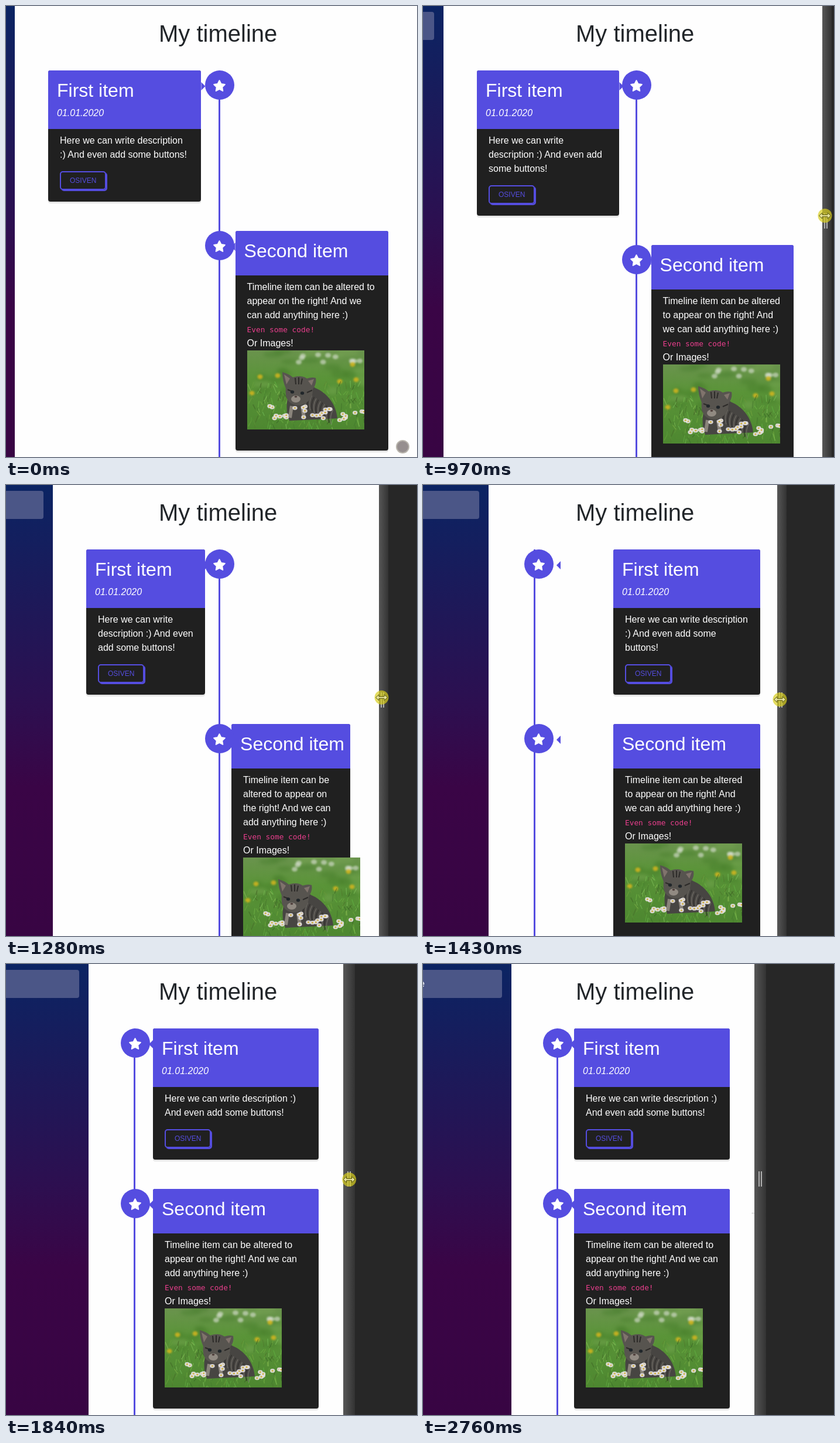
An HTML page for the animation above (3.47 s loop, 702x770 px).

```html
<!DOCTYPE html>
<html lang="en">
<head>
<meta charset="utf-8">
<title>My timeline</title>
<style>
:root { --accent: #554de0; }
* { box-sizing: border-box; }
html, body { margin: 0; width: 100%; height: 100%; overflow: hidden; }
body { font: 16px/24px "Liberation Sans", Arial, sans-serif; color: #fff; }
#stage { position: relative; width: 702px; height: 770px; overflow: hidden; background: #fefefe; }
#stage > * { position: absolute; }
#side { left: 0; top: 0; height: 770px; overflow: hidden;
  background: linear-gradient(#0b2463, #2d0f50 49%, #3a0546 67%, #380543); }
#field { position: absolute; left: -60px; right: 16px; top: 10px; height: 48px;
  border-radius: 4px; background: #4b5687; }
#field span { position: absolute; right: 132px; top: 12px; }
h1 { left: 261px; top: 23px; margin: 0; font-size: 40px; line-height: 48px; font-weight: 400;
  color: #212529; white-space: nowrap; }
#list { top: 110px; }
#line { position: absolute; top: 0; width: 3px; height: 700px; background: var(--accent); }
.row { position: relative; margin-bottom: 50px; }
.card { border-radius: 4px; background: #202020; box-shadow: 0 3px 0 #e5e5e5; }
.head { padding: 15px; background: var(--accent); border-radius: 3px 3px 0 0; white-space: nowrap; }
h2 { margin: 0 0 8px; font-size: 32px; line-height: 38px; font-weight: 400; }
.text { padding: 8px 19px 20px 20px; }
.text svg { display: block; margin-bottom: 16px; }
.button { display: block; width: max-content; height: 32px; margin-top: 16px; padding: 0 15px;
  border: 2px solid var(--accent); border-radius: 5px; box-shadow: 2px 2px 0 var(--accent);
  color: var(--accent); font-size: 12px; line-height: 28px; }
code { display: block; height: 24px; font: 12.8px/25px "DejaVu Sans Mono", monospace;
  color: #e83e8c; white-space: nowrap; }
.arrow { position: absolute; top: 20px; width: 7px; height: 14px; background: var(--accent); }
.arrow.left { clip-path: polygon(100% 0, 0 50%, 100% 100%); }
.arrow.right { clip-path: polygon(0 0, 100% 50%, 0 100%); }
.dot { position: absolute; top: 0; width: 50px; height: 50px; border-radius: 50%; background: var(--accent); }
.dot svg { display: block; }
#panel { top: 0; width: 702px; height: 770px; background: #272727; }
#bar { height: 770px; background: linear-gradient(90deg, #575757, #3c3c3c 75%, #333); }
#grip { position: absolute; top: 354px; width: 6px; height: 26px;
  border: solid #b0b0b0; border-width: 0 2px; }
#pointer { left: 0; top: 0; overflow: visible; }
.speck { background: #d5d5d5; }
</style>
</head>
<body>
<div id="stage">
  <h1>My timeline</h1>
  <div id="list">
    <div id="line"></div>
    <div class="row">
      <div class="card">
        <div class="head"><h2>First item</h2><i>01.01.2020</i></div>
        <div class="text">Here we can write description :) And even add some buttons!
          <span class="button">OSIVEN</span></div>
      </div>
      <div class="arrow"></div><div class="dot"></div>
    </div>
    <div class="row">
      <div class="card">
        <div class="head"><h2>Second item</h2></div>
        <div class="text">Timeline item can be altered to appear on the right! And we can add anything here :)
          <code>Even some code!</code>Or Images!
          <svg id="photo" width="200" height="135"></svg></div>
      </div>
      <div class="arrow"></div><div class="dot"></div>
    </div>
  </div>
  <div id="side"><div id="field"><span>e</span></div></div>
  <div id="panel"><div id="bar"></div><div id="grip"></div></div>
  <div class="speck" id="edgeSpeck" style="left:701px;top:352px;width:1px;height:8px"></div>
  <div class="speck" id="leftSpeck" style="left:561px;top:423px;width:5px;height:5px;clip-path:polygon(0 50%,40% 20%,40% 40%,100% 40%,100% 60%,40% 60%,40% 80%)"></div>
  <svg id="pointer" width="1" height="1">
    <circle id="halo" stroke-width="2"/>
    <path id="resize" d="M-10 0L-4.5-5V-1.6H4.5V-5L10 0L4.5 5V1.6H-4.5V5Z" fill="#e6e29a" stroke="#55540c"/>
  </svg>
</div>
<script>
const LOOP = 3470;
const $ = id => document.getElementById(id);
const all = sel => [...document.querySelectorAll(sel)];
const mix = (a, b, p) => a + (b - a) * p;
const clamp = x => Math.min(1, Math.max(0, x));
const px = (el, styles) => { for (const k in styles) el.style[k] = styles[k] + 'px'; };

// [time, left edge of the page]
const drag = [
  [0, 15], [770, 16], [820, 19], [870, 23], [920, 29], [960, 35], [1010, 42], [1060, 49],
  [1110, 56], [1150, 63], [1200, 70], [1250, 75],
  [1280, 80], [1330, 90], [1380, 101], [1430, 112], [1480, 122], [1520, 129], [1570, 134],
  [1610, 137], [1660, 138], [1740, 139],
  [1810, 141], [1850, 143], [1890, 146], [1930, 148], [1980, 150], [2020, 151]
];
const leave = [2450, 2490, 2540, 2580, 2630, 2670, 2720, 2760];

const star = Array.from({ length: 10 }, (_, i) => {
  const r = i % 2 ? 4.9 : 9.8, a = i * Math.PI / 5;
  return (24.5 + r * Math.sin(a)).toFixed(2) + ',' + (27 - r * Math.cos(a)).toFixed(2);
}).join(' ');
for (const dot of all('.dot')) dot.innerHTML =
  `<svg width="50" height="50"><polygon points="${star}" fill="#fff" stroke="#fff" stroke-width="2" stroke-linejoin="round"/></svg>`;

function paintPhoto() {
  let seed = 11;
  const rnd = (a, b) => (seed = seed * 16807 % 2147483647, a + (b - a) * seed / 2147483647);
  const many = (n, f) => Array.from({ length: n }, (_, i) => f(i)).join('');
  const blob = (x, y, rx, ry, c, o = 1) =>
    `<ellipse cx="${x}" cy="${y}" rx="${rx}" ry="${ry}" fill="${c}" opacity="${o}"/>`;
  const grass = many(260, () => {
    const x = rnd(0, 200), y = rnd(60, 140);
    return `<path d="M${x} ${y}l${rnd(-6, 6)} ${-rnd(5, 13)}" stroke="hsl(${rnd(88, 105)} 45% ${rnd(24, 58)}%)" stroke-width="1.3" opacity=".6"/>`;
  });
  const haze = many(24, () =>
    blob(rnd(0, 200), rnd(0, 70), rnd(8, 18), rnd(4, 9), rnd(0, 1) < .5 ? '#7aa955' : '#437a29', .4));
  const far = many(11, () => blob(rnd(85, 200), rnd(0, 22), 5, 4, '#d3dccb', .65));
  const gold = [[22, 45], [52, 43], [158, 53], [186, 50], [180, 24], [8, 73]]
    .map(([x, y]) => blob(x, y, 4.5, 4, '#d3b51f', .85)).join('');
  const daisies = many(30, i => {
    const x = i < 8 ? rnd(34, 70) : rnd(70, 199), y = rnd(94, 119);
    return blob(x, y, 4.2, 3.4, '#e6e1e0', .9) + blob(x, y, 1.5, 1.3, '#cfae35');
  });
  const fur = many(14, i => {
    const x = 100 + i * 3.6, y = 70 + i * 2.4;
    return `<path d="M${x} ${y}q-7 12 -3 25" stroke="${i % 2 ? '#757069' : '#2c2a28'}" stroke-width="1.6" fill="none" opacity=".7"/>`;
  });
  $('photo').innerHTML = `<defs><linearGradient id="meadow" x2="0" y2="1">
      <stop stop-color="#6a934d"/><stop offset=".35" stop-color="#5a9438"/><stop offset="1" stop-color="#4d8730"/>
    </linearGradient></defs>
    <rect width="200" height="135" fill="url(#meadow)"/>
    <g style="filter:blur(3px)">${haze}</g>
    <g style="filter:blur(1.5px)">${far}${gold}</g>${grass}
    <g style="filter:blur(.6px)">
      <path d="M72 72C78 58 104 54 116 64C136 72 152 92 154 116L72 120C66 104 66 88 72 72Z" fill="#474542"/>${fur}
      <path d="M60 37Q71 40 78 46Q92 41 102 48Q110 45 117 47Q119 57 112 66Q113 82 100 90Q86 98 73 89Q64 82 66 65Q60 52 60 37Z" fill="#57544f"/>
      <path d="M63 41L73 48L67 58ZM114 49L104 52L110 60Z" fill="#80736c"/>
      <path d="M82 47l1 11M88 46v12M94 48l-2 10M69 67l8 3M111 68l-9 4" stroke="#2d2b29" stroke-width="2"/>
      ${blob(77, 71, 3.2, 2.7, '#20262a')}${blob(94, 73, 3.2, 2.7, '#20262a')}
      ${blob(83, 83, 8, 6, '#918a82')}${blob(83, 79, 2.3, 1.6, '#493936')}
      <path d="M76 95l-3 20M94 95l3 20" stroke="#8a847b" stroke-width="6"/>
    </g>
    <g style="filter:blur(.5px)">${daisies}</g>`;
}

function layout(t, left) {
  const right = 717 - left, x = left + 57, c = 611 - 2 * left;
  const narrow = t >= 1330, u = clamp((t - 1300) / 280), p = u * u * (3 - 2 * u);
  const cards = all('.card'), arrows = all('.arrow'), dots = all('.dot');
  const midDot = c / 2 - 22.5;

  px($('list'), { left: x, width: c });
  px($('line'), { left: narrow ? 20 : c / 2 + .5 });
  cards.forEach((card, i) => {
    let w = .45 * c, at = i ? c - w : 0, tip = i ? at - 7 : w;
    let dot = midDot;
    if (narrow) {
      const home = .143 * c + 5.8;
      at = Math.round(mix(.6 * c, home, p));
      w = mix(.484 * c, .821 * c + 12.4, p);
      tip = Math.round(home + 9 * (1 - p)) - 7;
      dot = Math.round(mix(Math.round(.02 * c - 9), midDot, (1 - u) ** 5.7));
    }
    px(card, { marginLeft: at, width: w });
    px(arrows[i], { left: tip });
    arrows[i].className = 'arrow ' + (narrow || i ? 'left' : 'right');
    px(dots[i], { left: dot });
  });

  const extra = left < 120 ? 0 : 4;
  px($('side'), { width: left });
  px($('panel'), { left: right });
  px($('bar'), { width: 16 + extra });
  px($('grip'), { left: 3 + extra });
  return { x: right + 4.5 + extra * 1.4, y: Math.min(368, 356 + (left - 15) * .105) };
}

function showPointer(t, grab) {
  const held = t >= 770 && t < 2450;
  let at = null;
  if (t < 40) at = { x: 677.5, y: 752.5 };
  else if (held) at = grab;
  else if (t >= 2450 && t < 2760) {
    const u = leave.filter(s => s <= t).length / 7;
    at = { x: 576 - 48 * u ** 1.3, y: 370 + 372 * u ** 1.9 };
  }
  $('pointer').style.display = at ? 'block' : 'none';
  if (at) $('pointer').style.transform = `translate(${at.x}px, ${at.y}px)`;
  $('halo').setAttribute('fill', held ? 'rgba(215,205,30,.7)' : 'rgba(110,100,100,.72)');
  $('halo').setAttribute('stroke', held ? 'none' : '#b8b4ac');
  $('halo').setAttribute('r', held ? 12 : 10.5);
  $('resize').style.display = held ? 'block' : 'none';
  $('edgeSpeck').style.display = t >= 730 && t < 770 ? 'block' : 'none';
  $('leftSpeck').style.display = t >= 2540 ? 'block' : 'none';
}

function render() {
  const t = performance.now() % LOOP;
  const [start, left] = drag.filter(s => s[0] <= t).pop();
  showPointer(t, layout(start, left));
  requestAnimationFrame(render);
}

paintPhoto();
render();
</script>
</body>
</html>
```
